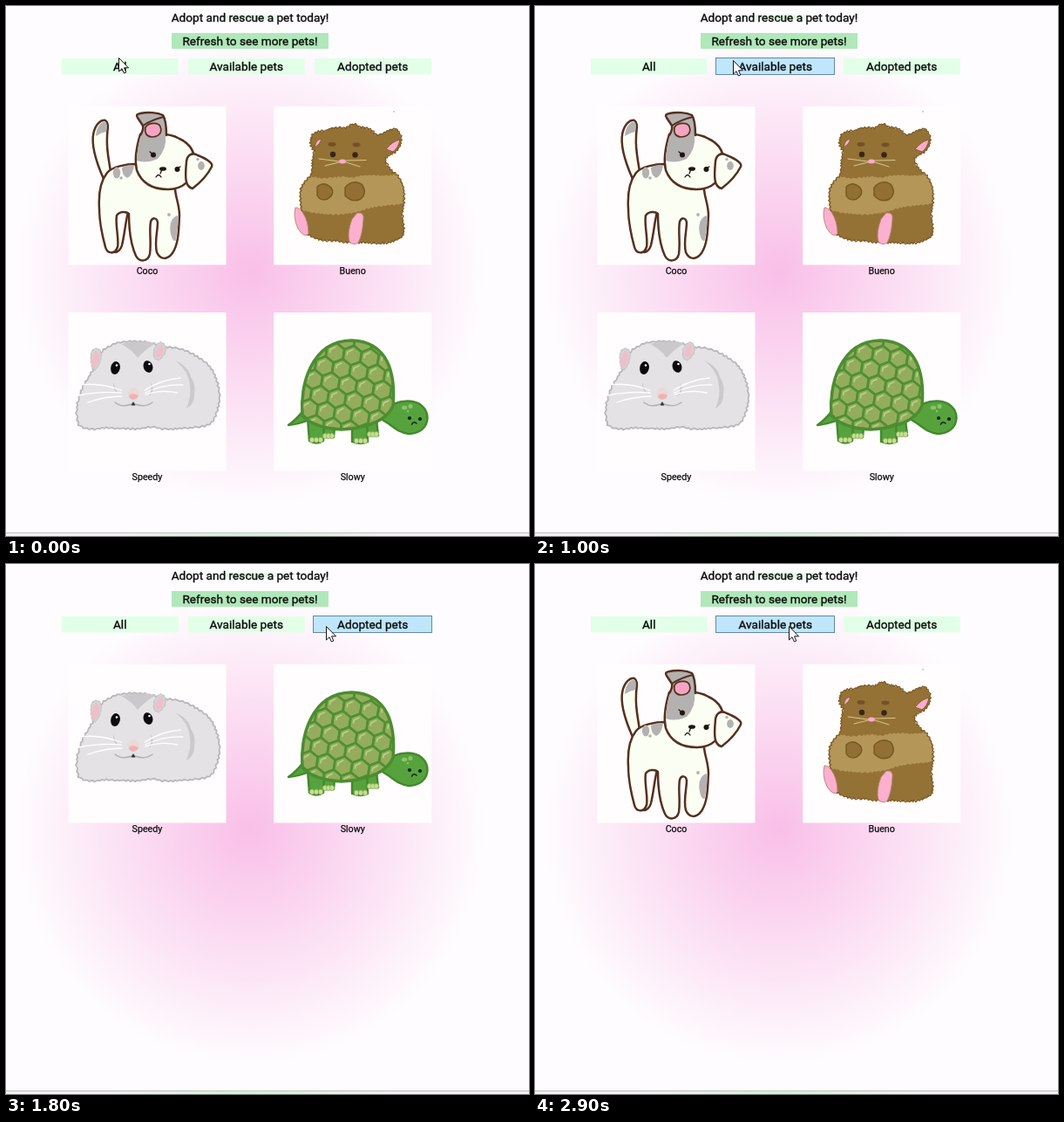
An HTML page that plays this animation: 600 by 607 pixels, repeating every 3000 ms.

```html
<!DOCTYPE html>
<html lang="en">
<head>
<meta charset="utf-8">
<title>Pet adoption</title>
<style>
  html, body { margin: 0; width: 100%; height: 100%; overflow: hidden; background: #fefcfe; }
  svg { display: block; width: 100vw; height: 100vh; }
  text { font-family: Roboto, "Open Sans", sans-serif; font-size: 13.65px; text-anchor: middle; fill: #0c0c0c; stroke: #0c0c0c; stroke-width: .35; }
  .name { font-size: 10.7px; stroke-width: .25; }
  .dog { fill: #fbfff3; stroke: #55301f; stroke-width: 2.5; stroke-linejoin: round; stroke-linecap: round; }
  .line { fill: none; stroke-linecap: round; stroke-linejoin: round; }
  .grey { fill: #b4b1b1; stroke: none; }
  .leg { fill: #56a33e; stroke: #43892c; stroke-width: 2.4; stroke-linejoin: round; }
</style>
</head>
<body>
<svg id="stage" viewBox="0 0 600 607">
  <defs>
    <radialGradient id="pink" gradientUnits="userSpaceOnUse" cx="280" cy="304" r="268">
      <stop offset="0" stop-color="#f9bfe8"/><stop offset="1" stop-color="#fefcfe"/>
    </radialGradient>
    <radialGradient id="mint">
      <stop offset="0" stop-color="#c8f5cf"/><stop offset="1" stop-color="#c8f5cf" stop-opacity="0"/>
    </radialGradient>
    <clipPath id="shellClip"><path id="shellShape" d="M340 233C337 200 349 148 396 147C439 148 447 186 444 222C437 238 418 247 385 249C365 248 350 244 340 233Z"/></clipPath>
  </defs>

  <rect width="600" height="607" fill="#fefcfe"/>
  <rect width="600" height="607" fill="url(#pink)"/>
  <ellipse cx="280" cy="13" rx="54" ry="4.5" fill="url(#mint)"/>
  <rect y="603" width="600" height="4" fill="#f3f1f3"/>
  <rect y="603" width="600" height="1" fill="#bdbbbd"/>
  <ellipse cx="280" cy="606" rx="160" ry="3" fill="url(#mint)"/>
  <text x="280" y="17.5">Adopt and rescue a pet today!</text>
  <rect x="190" y="31" width="180" height="18" fill="#b0e8b9"/>
  <text x="280" y="44.8">Refresh to see more pets!</text>
  <g id="tabs"></g>

  <g id="Coco">
    <path class="dog" d="M112 198C104 180 97 160 100.500 145C103 135 109 130 114 131C119 134 116 142 116 150C115 165 118 175 120 190"/>
    <path class="grey" d="M103 149C104 137 110 132 114 132.500C117 135 115.500 140 115 144Q109 145 103 149Z"/>
    <path class="dog" d="M123 279C124 285 131 281 133 274C136 262 137 248 140 236"/>
    <path class="dog" d="M150 181C137 181 122 184 116 191C108 201 106 216 107 232C107 249 111 265 114 276C116 284 125 285 128 276C130 267 125 250 127 240C130 235 138 235 141 238C141 256 143 273 149 286C153 294 163 293 165 284C167 271 164 258 166 247C168 242 173 242 174 248C174 258 170 270 173 282C177 291 185 291 191 283C199 271 198 252 199 240C199 226 193 216 194 206Z"/>
    <path class="grey" d="M197.500 240C189 241 187 253 189 261Q191 270 194.500 269Q198 255 197.500 240Z"/>
    <g class="grey">
      <ellipse cx="127" cy="191" rx="4.200" ry="6.500"/>
      <path d="M133 185Q140 181 147 182.500Q145 195 139 197Q133 194 133 185Z"/>
      <circle cx="132" cy="197" r="1.800"/><circle cx="187" cy="239" r="1.900"/>
    </g>
    <path class="dog" d="M154 147C150 160 147 175 150 188C156 204 170 210 186 210C203 210 214 199 216 184C218 169 212 158 199 152C190 147 178 146 168 147Z"/>
    <path class="grey" d="M155 146L183 148Q185 163 174 175Q161 181 150 177Q151 160 155 146Z"/>
    <path class="dog" style="fill:#b4b1b1" d="M154 148Q158 142 157 137L151 128Q148 124 154 123C163 121 174 122 180 125C184 131 184 140 184 148"/>
    <path class="line" stroke="#55301f" stroke-width="2" d="M157 137Q168 130 181 127"/>
    <path class="dog" style="fill:#f5a5c2;stroke-width:1.700" d="M160 139C163 134 174 132 177 138C180 146 174 150 167 150C160 149 159 144 160 139Z"/>
    <path class="dog" d="M207 178C208 171 213 167 220 171C230 175 238 180 236 184C231 194 222 203 214 209C206 207 205 199 207 178Z"/>
    <ellipse class="grey" cx="224" cy="183" rx="3.800" ry="5"/><circle class="grey" cx="220" cy="175.500" r="1.700"/>
    <g fill="#201512">
      <circle cx="169" cy="170.500" r="3"/><circle cx="196.500" cy="187" r="3"/>
      <ellipse cx="180" cy="186.500" rx="4" ry="2.300"/>
    </g>
    <path class="line" stroke="#201512" stroke-width="1.300" d="M169 170L165 167M196 186L200 184M179 187L177 192M172 196Q175 191 178 196"/>
  </g>

  <g id="Bueno">
    <g id="buenoBody"></g>
    <path fill="#fbabcb" stroke="#80602a" d="M354 162Q356 151 362 153Q360 159 354 162ZM436 164Q443 155 452 153Q450 163 444 167Z"/>
    <g fill="#927035" stroke="#775822" stroke-width="1.400">
      <path d="M357 207Q364 200 373 208Q378 215 369 221Q361 224 357 217ZM389 208Q397 198 408 204Q415 214 407 221Q397 226 389 217Z"/>
    </g>
    <g fill="#715226"><ellipse cx="374" cy="158.500" rx="4.500" ry="2.400"/><ellipse cx="402" cy="159" rx="4.500" ry="2.400"/></g>
    <g fill="#37261a"><circle cx="375" cy="170" r="3.200"/><circle cx="400.500" cy="170.500" r="3.200"/></g>
    <path class="line" stroke="#dcc58f" d="M359 175L382 178M366 183L382 179M390 177L413 176.500M390 179L406 184"/>
    <ellipse cx="386" cy="178" rx="4" ry="2.500" fill="#fbabcb"/>
    <g fill="#fbb0d0" stroke="#b98370" stroke-width=".9">
      <path d="M332 231Q329 242 335 255Q342 266 347 261Q347 246 340 236Q335 230 332 231Z"/>
      <path d="M403 237Q411 236 410 244Q409 262 404 271Q399 275 394 270Q391 260 397 244Z"/>
    </g>
    <circle cx="445" cy="121" r=".7" fill="#9a8a70"/>
  </g>

  <g id="Speedy">
    <g id="speedyBody"></g>
    <path fill="#cac8cb" d="M132 151Q151 146 172 150Q160 157 151 167Q145 158 132 151Z"/>
    <path fill="#cbc9cd" d="M194 170Q210 177 212 189Q218 197 216 208Q217 219 207 225Q213 211 211 198Q209 181 194 170Z"/>
    <g id="speedyEars"></g>
    <path fill="#eebfc9" d="M99 178Q97 165 103 159Q109 164 107 170L102 179ZM172 166Q171 154 179 151Q182 158 178 166Z"/>
    <path fill="#c5c2c5" d="M123 195Q125 204 130 209Q122 204 123 195ZM166 195Q172 204 164 211Q168 202 166 195Z"/>
    <g fill="#0b0b0d">
      <ellipse cx="125.500" cy="178.500" rx="5.300" ry="7.500" transform="rotate(12 125.5 178.5)"/>
      <ellipse cx="163" cy="177" rx="5.300" ry="7" transform="rotate(-18 163 177)"/>
    </g>
    <g fill="#fff"><circle cx="127" cy="175.500" r="1.300"/><circle cx="164.500" cy="174" r="1.300"/></g>
    <ellipse cx="146.500" cy="208" rx="6.500" ry="7" fill="#ecd8d6"/>
    <path fill="#efb3b7" d="M141 210Q146 206 152 210Q151 214 146 215Q141 214 141 210Z"/>
    <path class="line" stroke="#b3b0b4" stroke-width="1.500" d="M125 218Q134 225 146 219Q158 225 168 218"/>
    <path fill="#353136" d="M146 217L148.500 221.500H143.500Z"/>
    <path class="line" stroke="#fff" stroke-width="1.300" d="M132 204Q108 195 85 198M132 207Q107 205 83 210M133 211Q113 211 94 218M159 204Q178 192 200 190M160 207Q180 197 203 198M160 209Q178 203 197 207"/>
  </g>

  <g id="Slowy">
    <path class="leg" d="M324 244Q334 237 341 227L348 238Q336 243 324 244Z"/>
    <path class="leg" d="M361 246L365 258H376L377 246ZM413 246L415 256H427L425 238Z"/>
    <path class="leg" d="M346 237L348 262Q356 267 364 262L365 244ZM397 244V263Q407 267 415 263L414 240Z"/>
    <g id="toes" fill="#c9de94" stroke="#8cae54" stroke-width=".7"></g>
    <path class="leg" d="M432 228C440 221 450 216 462 216.500C475 217 483.500 225 483.500 236C483 247 474 254 462 254C450 253 443 244 432 238Z"/>
    <g fill="#8cc468"><ellipse cx="457" cy="224" rx="3.200" ry="2.300"/><circle cx="464" cy="222.500" r="2.500"/><circle cx="461" cy="228" r="1.200"/></g>
    <g fill="#132313"><circle cx="463" cy="236" r="2.100"/><circle cx="475" cy="237" r="2.100"/></g>
    <path class="line" stroke="#132313" stroke-width="1.500" d="M465.500 243Q468 239 471 242"/>
    <use href="#shellShape" fill="#94ad5c"/>
    <g clip-path="url(#shellClip)"><g id="cells" transform="rotate(9 392 198)"></g></g>
    <use href="#shellShape" fill="none" stroke="#4c8d32" stroke-width="3.500"/>
  </g>

  <path id="cursor" fill="#fff" stroke="#151515" stroke-linejoin="round" d="M.5 .5V16L4 12.700L6.400 18L8.800 17L6.500 11.800H11.500Z"/>
</svg>
<script>
const byId = id => document.getElementById(id);
const add = (parent, tag, attrs, text) => {
  const el = document.createElementNS('http://www.w3.org/2000/svg', tag);
  for (const key in attrs) el.setAttribute(key, attrs[key]);
  if (text) el.textContent = text;
  return parent.appendChild(el);
};

let seed = 7;
const rand = () => (seed = seed * 16807 % 2147483647) / 2147483647;

// Turns a smooth outline into a tufted one.
function fur(parent, d, spacing, depth, attrs) {
  const path = add(parent, 'path', { d, 'stroke-linejoin': 'round', ...attrs });
  const length = path.getTotalLength();
  const points = [];
  for (let s = 0, side = 1; s < length; s += spacing * (.6 + .8 * rand()), side = -side) {
    const p = path.getPointAtLength(s), q = path.getPointAtLength(Math.min(s + .5, length));
    const len = Math.hypot(q.x - p.x, q.y - p.y) || 1;
    const off = side * depth * (.3 + .7 * rand());
    points.push((p.x + (q.y - p.y) / len * off).toFixed(1) + ' ' + (p.y - (q.x - p.x) / len * off).toFixed(1));
  }
  path.setAttribute('d', 'M' + points.join('L') + 'Z');
}

const buenoShape = 'M350 151C351 144 360 143 367 143C373 138 384 139 390 140C396 134 402 133 406 139C412 138 420 141 425 148C432 147 440 141 447 140C455 147 455 157 449 165C445 170 438 170 435 175C437 184 442 189 448 193C456 201 458 214 456 229C452 240 458 250 456 262C450 269 440 272 425 272C415 270 408 272 400 270C390 272 380 268 372 269C365 269 352 267 346 261C341 253 339 240 338 225C336 210 340 202 349 195C353 186 350 176 354 166C349 161 349 156 350 151Z';
const buenoBand = 'M349 195C368 201 380 192 397 197C415 190 432 197 448 193C456 201 458 214 455 227C440 228 428 229 415 232C395 239 372 242 339 234C336 218 335 205 349 195Z';
const buenoEdge = { fill: 'none', stroke: '#7d5d27', 'stroke-width': 1.3 };
fur(byId('buenoBody'), buenoShape, 2.2, 1, { fill: '#947236' });
fur(byId('buenoBody'), buenoBand, 2.5, 1, { fill: '#b59659' });
fur(byId('buenoBody'), buenoShape, 2.2, 1.3, buenoEdge);

const speedyShape = 'M101 178C102 164 111 157 124 151C140 146 165 147 181 155C201 154 215 162 227 171C238 179 243 193 245 207C246 220 241 234 236 241C225 250 207 245 190 249C176 249 168 244 157 248C140 249 124 247 112 247C101 250 88 248 83 244C79 231 82 215 87 202C92 193 96 188 101 178Z';
const earFur = { fill: '#d6d2d6', stroke: '#c3c0c5' };
fur(byId('speedyBody'), speedyShape, 3, 1.1, { fill: '#e4e2e5', stroke: '#b9b7bb', 'stroke-width': 1.8 });
fur(byId('speedyEars'), 'M99 180Q94 158 103 156Q111 157 109 166Q108 175 102 181Z', 2.5, .6, earFur);
fur(byId('speedyEars'), 'M170 167Q168 154 176 149Q184 149 183 159Q181 167 174 170Z', 2.5, .6, earFur);

// Honeycomb shell with a glint in each cell.
for (let row = -4; row <= 4; row++) {
  for (let col = -4; col <= 4; col++) {
    const x = 392 + (col + (row & 1) / 2) * 20, y = 198 + row * 17;
    const corners = [0, 1, 2, 3, 4, 5].map(k => {
      const a = (k + .5) * Math.PI / 3;
      return (x + 11.4 * Math.cos(a)).toFixed(1) + ',' + (y + 11.4 * Math.sin(a)).toFixed(1);
    });
    add(byId('cells'), 'polygon', { points: corners.join(' '), fill: '#94ad5c', stroke: '#4f9035', 'stroke-width': 2.7 });
    add(byId('cells'), 'path', { class: 'line', d: `M${x - 6} ${y}V${y - 3}L${x - 1} ${y - 6.5}`, stroke: '#b9cf87', 'stroke-width': 1.7 });
  }
}

// Toes: left end, height, spacing.
for (const [x, y, gap] of [[351, 261, 5], [402, 262, 5], [366, 256.5, 4], [417, 254.5, 4]])
  for (let i = 0; i < 3; i++) add(byId('toes'), 'ellipse', { cx: x + i * gap, cy: y, rx: 2.6, ry: 3 });

const pets = [['Coco', 0], ['Bueno', 1], ['Speedy', 0], ['Slowy', 1]].map(([name, col]) => {
  const group = byId(name), x = 71.5 + 235.7 * col;
  group.prepend(add(group, 'rect', { x, y: 115, width: 181, height: 181.5, fill: '#fffdfe' }));
  add(group, 'text', { class: 'name', x: x + 90.5, y: 306.8 }, name);
  return group;
});

const tabs = [['All', 64], ['Available pets', 209], ['Adopted pets', 354]].map(([label, x]) => {
  const box = add(byId('tabs'), 'rect', {});
  add(byId('tabs'), 'text', { x: x + 66.7, y: 73.7 }, label);
  return { x, box };
});

function paintTab({ x, box }, over, pressed) {
  const attrs = over
    ? { x: x - 1.5, y: 59.5, width: 136, height: 19, fill: pressed ? '#c5e7f6' : '#bfe6fb', stroke: '#6289a3' }
    : { x, y: 60, width: 133.7, height: 18.4, fill: '#e2ffe8', stroke: 'none' };
  for (const key in attrs) box.setAttribute(key, attrs[key]);
}

// Pointer stops: time, x, y.
const stops = [
  [0, 129, 59], [300, 120, 68], [700, 120, 68], [1000, 227, 62], [1200, 231, 60],
  [1400, 231, 60], [1800, 367, 71], [2000, 384, 70], [2400, 384, 70], [2900, 291, 71], [3000, 291, 71]
];

function pointerAt(t) {
  const i = stops.findIndex(s => s[0] > t);
  const [t0, x0, y0] = stops[i - 1], [t1, x1, y1] = stops[i];
  const k = (t - t0) / (t1 - t0), e = k * k * (3 - 2 * k);
  return [Math.round(x0 + (x1 - x0) * e), Math.round(y0 + (y1 - y0) * e)];
}

function draw(t) {
  const tick = Math.floor(t / 100) * 100;
  const [x, y] = pointerAt(tick);
  byId('cursor').setAttribute('transform', `translate(${x} ${y})`);
  tabs.forEach(tab => paintTab(tab, y >= 60 && x >= tab.x && x < tab.x + 134, tick >= 2200 && tick < 2400));

  const view = tick < 1300 ? 'all' : tick < 2300 ? 'available' : 'adopted';
  pets.forEach((pet, i) => {
    const available = i > 1;
    pet.style.display = view === 'all' || available === (view === 'available') ? '' : 'none';
    pet.setAttribute('transform', `translate(0 ${view === 'all' && available ? 236 : 0})`);
  });
}

const start = performance.now();
function loop() {
  draw((performance.now() - start) % 3000);
  requestAnimationFrame(loop);
}
loop();
</script>
</body>
</html>
```
